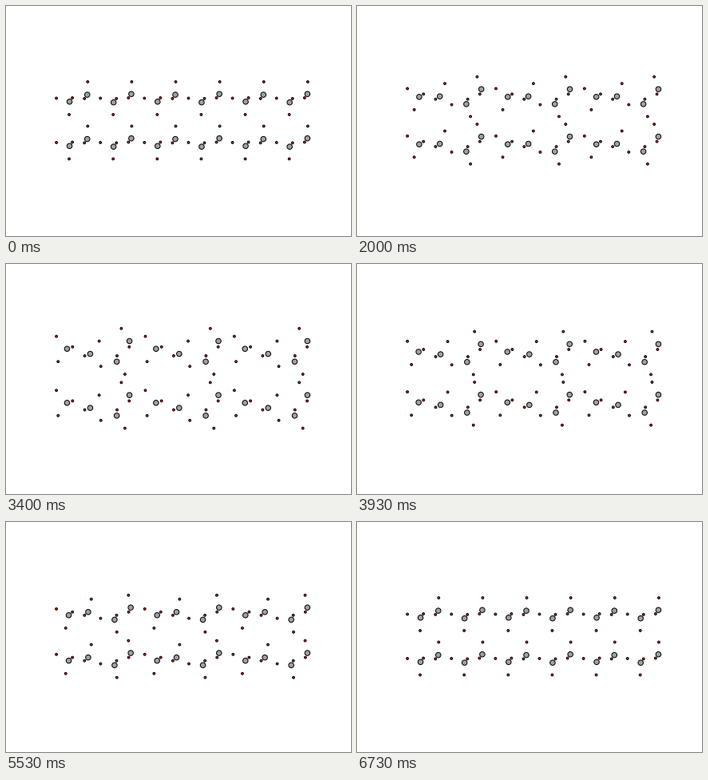
Animation, 432 px wide and 288 px high, one loop 6.83 s. Source, as a matplotlib script:

```python
import numpy as np
import matplotlib.pyplot as plt
from matplotlib.animation import FuncAnimation

W, H = 432, 288
LOOP, TICK = 6830, 10          # ms
PEAK = 34                      # largest turn, in degrees
COLS, ROWS = 3, 2
LEFT, MID, SPAN = 63.1, 143.2, 314.3

# Positions in units of the cell width, from the centre of a turning unit.
SILICON = np.array([0.1007, -0.0435])
INNER = np.array([0.0685, 0])
OUTER = np.array([0.1052, -0.186])
BRIDGE = np.array([0.25, 0])
SKEW = np.array([0, 0.004])    # built-in tilt, opposite in the two units
CELL_HEIGHT = 0.5034


def angle_at(ms):
    """One degree per 100 ms; the first step after the peak lasts only 30 ms."""
    k = ms // 100 if ms < 3530 else 36 + (ms - 3530) // 100
    return PEAK - abs(k - PEAK)


def turn(r, t):
    """Rotate r by atan(t), scaled back so that the cell keeps its width."""
    x, y = r
    return np.array([x - t * y, y + t * x])


def positions(angle):
    """Rigid units counter-rotate while the view zooms to a constant span."""
    t = np.tan(np.radians(angle))
    a = SPAN / (COLS - 0.25 + turn(SILICON, -t)[0])
    b = CELL_HEIGHT * a * np.hypot(1, t)
    oxygen, silicon = [], []
    for sign, shift in ((1, 0.25), (-1, 0.75)):
        centre = np.array([LEFT + shift * a, MID - b / 2])
        for side in (1, -1):
            def place(r, skew=0):
                return centre + side * a * (turn(r, sign * t) + sign * skew)
            oxygen += [place(INNER, SKEW), place(OUTER)]
            silicon.append(place(SILICON, SKEW))
            if sign > 0:
                oxygen.append(place(BRIDGE))
    cell = np.array(oxygen + silicon)
    return np.concatenate([cell + (i * a, j * b)
                           for j in range(ROWS) for i in range(COLS)])


fig = plt.figure(figsize=(W / 72, H / 72), dpi=72, facecolor="white")
ax = fig.add_axes([0, 0, 1, 1])
ax.set(xlim=(0, W), ylim=(H, 0))
ax.axis("off")

cells = COLS * ROWS
sizes = ([2.8 ** 2] * 10 + [6.5 ** 2] * 4) * cells
colors = (["#ff0000"] * 10 + ["#a0a0a0"] * 4) * cells
start = positions(0)
atoms = ax.scatter(start[:, 0], start[:, 1], s=sizes, c=colors,
                   edgecolors="black", linewidths=1)


def update(i):
    atoms.set_offsets(positions(angle_at(i * TICK)))
    return [atoms]


anim = FuncAnimation(fig, update, frames=LOOP // TICK, interval=TICK,
                     repeat=True, repeat_delay=0, cache_frame_data=False)
plt.show()
```
